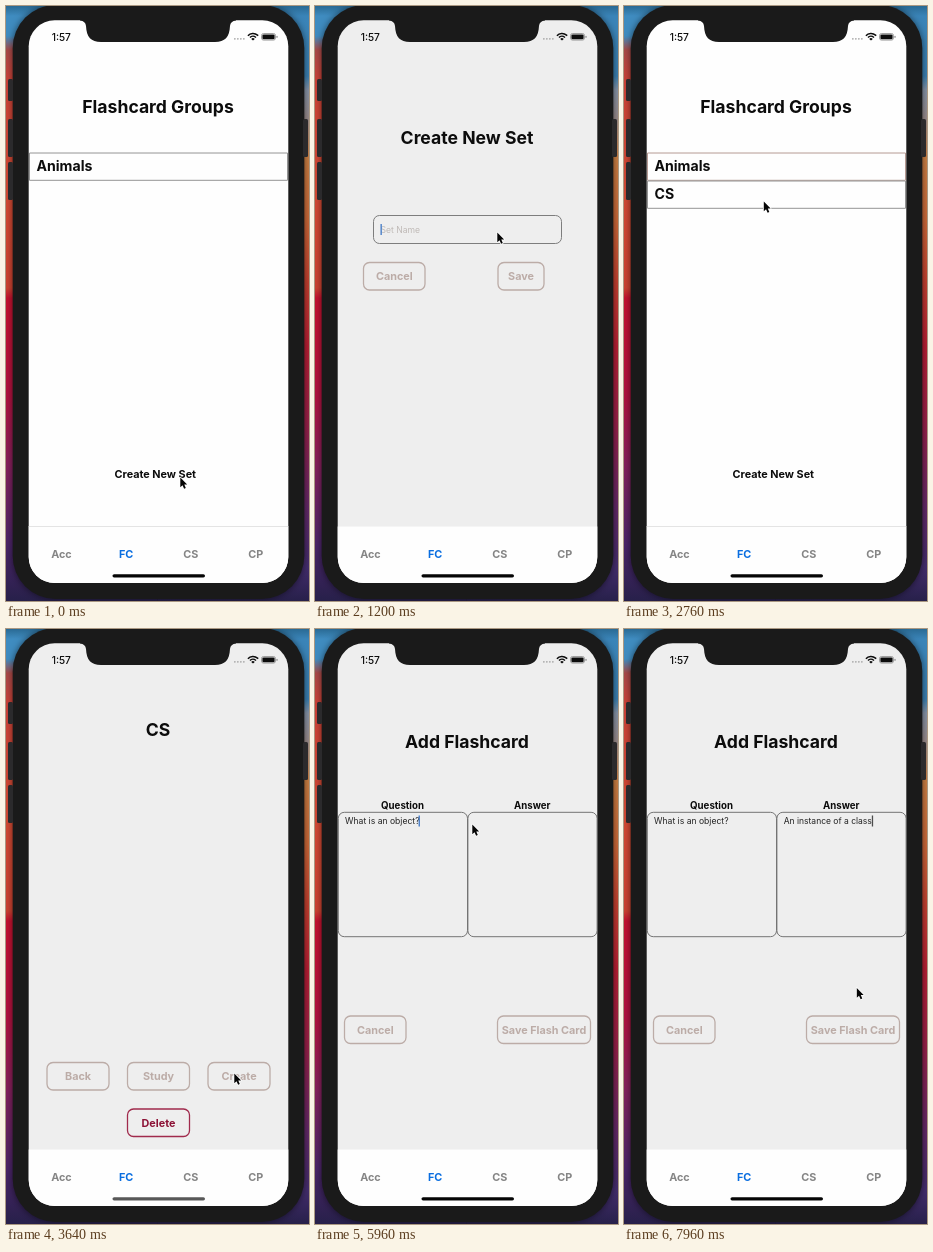
These frames come from a looping animation (303 by 595 pixels, 8000 ms). An HTML page with a canvas:

```html
<!DOCTYPE html>
<html lang="en">
<head>
<meta charset="utf-8">
<title>Flashcards</title>
<style>
  html, body { margin: 0; width: 100%; height: 100%; overflow: hidden; background: #1b1b1b; }
  canvas { display: block; width: 303px; height: 595px; }
</style>
</head>
<body>
<canvas id="stage"></canvas>
<script>
const W = 303, H = 595, LOOP = 8000;
const canvas = document.getElementById('stage');
const ctx = canvas.getContext('2d');
const dpr = window.devicePixelRatio || 1;
canvas.width = W * dpr;
canvas.height = H * dpr;

const INK = '#0c0c0c', PAPER = '#eeeeee', TAN = '#bcaca7', BLUE = '#0a6ee0', BEZEL = '#1a1a1a';
const TITLE = 17.6, ROW = 14.1, LABEL = 10.8, SMALL = 9.7;

// Screen changes
const OPEN_FORM = 320, SAVE_SET = 2360, OPEN_SET = 2960, OPEN_CARD = 3840;
const FOCUS_Q = 4480, FOCUS_A = 6200;

// Pointer stops: time, x, y
const path = [
  [0, 174, 471], [480, 174, 471], [960, 182, 226], [1740, 182, 226],
  [2140, 206, 270], [2400, 206, 270], [2740, 139.5, 195], [3040, 139.5, 195],
  [3560, 228, 444], [3900, 228, 444], [4440, 142, 183], [5780, 142, 183],
  [5960, 157, 195], [6140, 184, 212], [7560, 184, 212], [7960, 232.5, 358.5]
];

function fillBox(x, y, w, h, r, color) {
  ctx.beginPath();
  ctx.roundRect(x, y, w, h, r);
  ctx.fillStyle = color;
  ctx.fill();
}

function strokeBox(x, y, w, h, r, color, line = 1) {
  ctx.beginPath();
  ctx.roundRect(x, y, w, h, r);
  ctx.strokeStyle = color;
  ctx.lineWidth = line;
  ctx.stroke();
}

// y is the middle of the capital letters
function text(str, x, y, size, { color = INK, weight = 700, align = 'center' } = {}) {
  ctx.font = `${weight} ${size}px Inter, sans-serif`;
  ctx.textAlign = align;
  ctx.fillStyle = color;
  ctx.fillText(str, x, y + size * 0.364);
  return ctx.measureText(str).width;
}

function button(label, x, y, w, color = TAN, ink = color) {
  strokeBox(x, y, w, 27.5, 6, color, 1.3);
  text(label, x + w / 2, y + 14, LABEL, { color: ink });
}

function verticalGradient(x, w, stops) {
  const g = ctx.createLinearGradient(0, 0, 0, H);
  for (const [y, color] of stops) g.addColorStop(y / H, color);
  ctx.fillStyle = g;
  ctx.fillRect(x, 0, w, H);
}

function wallpaper() {
  verticalGradient(0, W / 2, [
    [0, '#2a6a94'], [10, '#3f8cc0'], [30, '#3f8cc0'], [44, '#a94a48'], [75, '#cc4237'],
    [190, '#d24a33'], [282, '#cc4230'], [292, '#c5122f'], [390, '#b0123f'],
    [460, '#84205c'], [540, '#4a2468'], [595, '#27204a']
  ]);
  verticalGradient(W / 2, W / 2 + 1, [
    [0, '#2a6a94'], [10, '#3a84b8'], [70, '#3a80b2'], [84, '#8794a8'], [112, '#9a8c8c'],
    [150, '#cc8044'], [215, '#cc6838'], [275, '#c4402f'], [340, '#b81e34'],
    [420, '#96204a'], [500, '#642868'], [560, '#432c6c'], [595, '#27204a']
  ]);
}

function phone() {
  ctx.save();
  ctx.shadowColor = 'rgba(0, 0, 0, 0.55)';
  ctx.shadowBlur = 7 * dpr;
  fillBox(6.7, -1, 291.6, 594, 43, BEZEL);
  ctx.restore();
  for (const [x, y, h] of [[2, 73, 22], [2, 113, 38], [2, 156, 38], [297, 113, 38]])
    fillBox(x, y, 5, h, 1.5, '#2b2a2c');
}

function notch() {
  ctx.beginPath();
  ctx.moveTo(74, 13);
  ctx.lineTo(74, 14.5);
  ctx.quadraticCurveTo(79.5, 15, 80, 20);
  ctx.bezierCurveTo(80.5, 31, 85, 36, 95, 36);
  ctx.lineTo(209, 36);
  ctx.bezierCurveTo(219, 36, 223.5, 31, 224, 20);
  ctx.quadraticCurveTo(224.5, 15, 230, 14.5);
  ctx.lineTo(230, 13);
  ctx.fillStyle = BEZEL;
  ctx.fill();
}

function statusBar() {
  text('1:57', 55.3, 31, 10.2, { weight: 500 });
  for (let i = 0; i < 4; i++) fillBox(228 + i * 3, 32, 1.7, 1.7, 0.8, '#aaaaaa');

  ctx.strokeStyle = INK;
  ctx.lineWidth = 1.5;
  for (const r of [4, 6.8]) {
    ctx.beginPath();
    ctx.arc(247, 34.2, r, -Math.PI * 0.77, -Math.PI * 0.23);
    ctx.stroke();
  }
  ctx.beginPath();
  ctx.moveTo(247, 34.6);
  ctx.arc(247, 34.6, 2.4, -Math.PI * 0.77, -Math.PI * 0.23);
  ctx.fillStyle = INK;
  ctx.fill();

  strokeBox(255.5, 27.5, 14, 6.6, 2, '#8c8c8c', 0.8);
  fillBox(256.4, 28.4, 12.2, 4.8, 1.2, INK);
  fillBox(270.5, 29.8, 1, 2.2, 0.5, '#8c8c8c');
}

function tabBar(line, homeColor) {
  ctx.fillStyle = '#fefefe';
  ctx.fillRect(22, 520.5, 261, 57.5);
  if (line) {
    ctx.fillStyle = '#e4e4e4';
    ctx.fillRect(22, 520, 261, 1);
  }
  ['Acc', 'FC', 'CS', 'CP'].forEach((name, i) =>
    text(name, 55.4 + i * 64.75, 548, LABEL, { color: i === 1 ? BLUE : '#858585' }));
  fillBox(106.5, 568.2, 92.5, 3.2, 1.6, homeColor);
}

function caret(x, y, t, since, color = '#3f78c6') {
  const phase = (t - since) % 1000;
  const alpha = phase < 650 ? 1 : phase < 800 ? (800 - phase) / 150 : phase < 850 ? 0 : (phase - 850) / 150;
  ctx.globalAlpha = alpha;
  ctx.fillStyle = color;
  ctx.fillRect(x, y - 5.5, 1.3, 11);
  ctx.globalAlpha = 1;
}

function typed(str, t, from, to) {
  const share = Math.min(1, Math.max(0, (t - from) / (to - from)));
  return str.slice(0, Math.floor(share * str.length + 1e-6));
}

const body = { weight: 400, align: 'left', color: '#222222' };

function groups(t) {
  const saved = t >= SAVE_SET;
  text('Flashcard Groups', 152, 100.3, TITLE);
  const rows = saved ? ['Animals', 'CS'] : ['Animals'];
  rows.forEach((name, i) => {
    const y = 147 + i * 28;
    strokeBox(23.5, y, 258, 27.3, 0, saved && i === 0 ? '#b59a93' : '#949494');
    text(name, 30.5, y + 13.3, ROW, { align: 'left' });
  });
  const pressed = t > 220 && t < OPEN_FORM;
  text('Create New Set', 149.3, 468, LABEL, { color: pressed ? '#a0a0a0' : INK });
}

function setForm(t) {
  text('Create New Set', 152, 131.8, TITLE);
  strokeBox(58.5, 209.5, 188, 28, 6, '#7d7d7d');
  const name = t < 1480 ? '' : t < 1660 ? 'C' : 'CS';
  let w = 0;
  if (name) w = text(name, 65.5, 224, 8.6, body);
  else text('Set Name', 65.5, 224, 8.6, { ...body, color: '#bfb9b6' });
  if (t >= 1040) caret(65.5 + w, 223.5, t, name ? 1660 : 1040);
  button('Cancel', 48.5, 256.5, 61.5);
  button('Save', 183, 256.5, 46);
}

function setPage() {
  text('CS', 152, 100.8, TITLE);
  button('Back', 41, 433.5, 62);
  button('Study', 121.5, 433.5, 62);
  button('Create', 202, 433.5, 62);
  button('Delete', 121.5, 480, 62, '#a02a4c', '#8c1236');
}

function cardForm(t) {
  text('Add Flashcard', 152, 112.5, TITLE);
  text('Question', 87.5, 176.8, SMALL);
  text('Answer', 217.2, 176.8, SMALL);
  strokeBox(23.3, 183.3, 129.2, 124.4, 6, '#747474');
  strokeBox(152.9, 183.3, 129.2, 124.4, 6, '#747474');

  const wq = text(typed('What is an object?', t, 4760, 5720), 30, 192, 8.6, body);
  const wa = text(typed('An instance of a class', t, 6360, 7480), 159.7, 192, 8.5, body);
  if (t >= FOCUS_A) caret(159.7 + wa, 192, t, t < 7480 ? t : 7480, t < 7480 ? '#3f78c6' : '#4c4c4c');
  else if (t >= FOCUS_Q)
    caret(29 + wq, 192, t, t < 4760 ? FOCUS_Q : t < 5720 ? t : 5720, t < 4760 ? '#b4b4b8' : '#3f78c6');

  button('Cancel', 29.5, 387, 61.5);
  button('Save Flash Card', 182.5, 387, 93);
}

function pointer(t) {
  let i = path.findIndex(p => p[0] > t);
  if (i < 0) i = path.length;
  const a = path[i - 1], b = path[i] || a;
  const k = b === a ? 0 : (t - a[0]) / (b[0] - a[0]);
  const e = k * k * (3 - 2 * k);
  ctx.save();
  ctx.translate(a[1] + (b[1] - a[1]) * e + 0.3, a[2] + (b[2] - a[2]) * e + 0.6);
  ctx.scale(0.93, 0.93);
  ctx.beginPath();
  [[0, 0], [0, 10.4], [2.4, 8.2], [4.1, 12], [5.9, 11.2], [4.3, 7.5], [7.4, 7.3]]
    .forEach(([x, y]) => ctx.lineTo(x, y));
  ctx.closePath();
  ctx.lineJoin = 'round';
  ctx.lineWidth = 1.6;
  ctx.strokeStyle = '#ffffff';
  ctx.stroke();
  ctx.fillStyle = '#050505';
  ctx.fill();
  ctx.restore();
}

function draw(t) {
  ctx.setTransform(dpr, 0, 0, dpr, 0, 0);
  wallpaper();
  phone();

  const onGroups = t < OPEN_FORM || (t >= SAVE_SET && t < OPEN_SET);
  const onSet = t >= OPEN_SET && t < OPEN_CARD;
  ctx.save();
  ctx.beginPath();
  ctx.roundRect(22.7, 14.3, 259.6, 562.7, 26);
  ctx.clip();
  ctx.fillStyle = onGroups ? '#fefefe' : PAPER;
  ctx.fillRect(22, 14, 261, 564);
  if (onGroups) groups(t);
  else if (t < SAVE_SET) setForm(t);
  else if (onSet) setPage();
  else cardForm(t);
  tabBar(onGroups, onSet ? '#585858' : '#050505');
  statusBar();
  ctx.restore();

  notch();
  pointer(t);
}

const start = performance.now();
function tick() {
  draw((performance.now() - start) % LOOP);
  requestAnimationFrame(tick);
}
tick();
</script>
</body>
</html>
```
